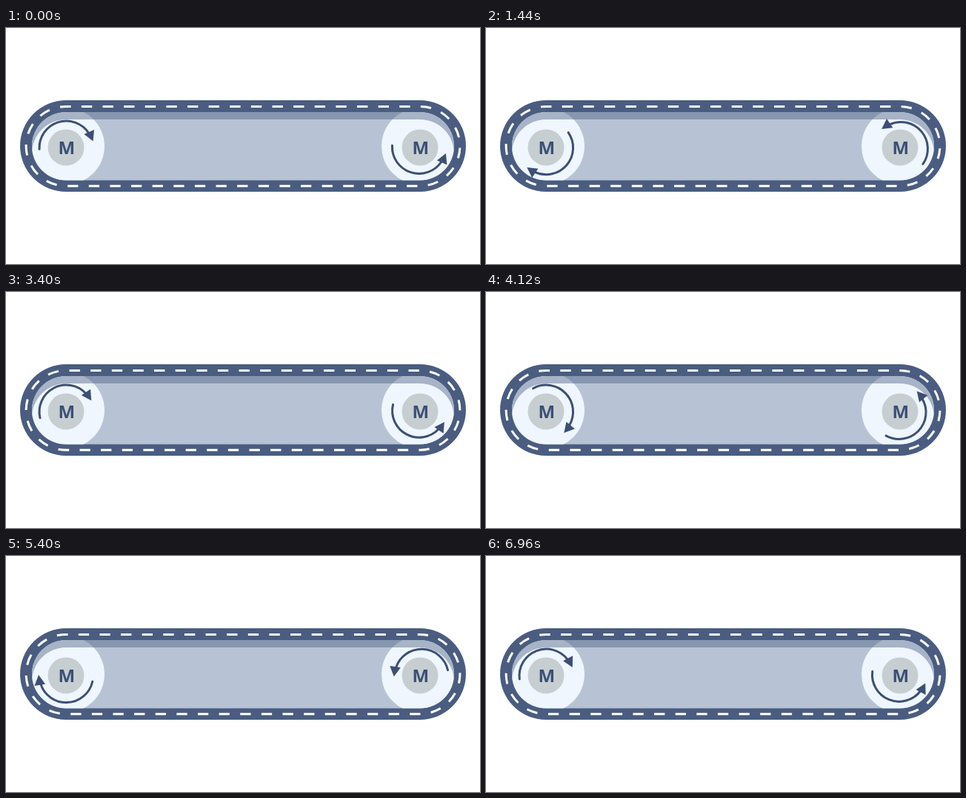
An HTML page for the animation above (7 s loop, 640 by 320 pixels).

```html
<!DOCTYPE html>
<html lang="en">
<head>
<meta charset="utf-8">
<title>Conveyor belt</title>
<style>
  html, body { margin: 0; width: 100%; height: 100%; overflow: hidden; background: #fff; }
  svg { display: block; width: 100%; height: 100%; }
  text { font: 700 24px "Open Sans", "Noto Sans", sans-serif; fill: #3a4f75; text-anchor: middle; }
  .dash { fill: none; stroke: #fff; stroke-width: 3; }
</style>
</head>
<body>
<svg viewBox="0 0 640 320" xmlns="http://www.w3.org/2000/svg">
  <defs>
    <clipPath id="inside"><rect x="35" y="114" width="570" height="92.5" rx="46.2"/></clipPath>
    <g id="arrow">
      <path d="M-36.25 1.9A36.3 36.3 0 0 1 30.4 -19.8" fill="none" stroke="#3c4f75" stroke-width="3" stroke-linecap="round"/>
      <path d="M36.2 -8.9L24.2 -18.4L37.7 -24.4Z" fill="#3c4f75"/>
    </g>
  </defs>

  <rect x="19" y="98" width="602" height="124" rx="62" fill="#4a5d80"/>
  <g clip-path="url(#inside)">
    <rect x="35" y="114" width="570" height="93" fill="#b7c2d5"/>
    <circle cx="81" cy="160.3" r="52" fill="#eff6fd"/>
    <circle cx="559" cy="160.3" r="52" fill="#eff6fd"/>
    <path fill="#485b7e" fill-opacity=".43" fill-rule="evenodd"
      d="M30 110H610V220H30ZM81.2 124H558.8a46.2 46.2 0 0 1 0 92.4H81.2a46.2 46.2 0 0 1 0 -92.4Z"/>
  </g>

  <path class="dash" id="run" d="M81 106.4H559a53.9 53.9 0 0 1 0 107.8H81"/>
  <path class="dash" id="bend" d="M81 214.2a53.9 53.9 0 0 1 0 -107.8"/>

  <circle cx="81" cy="162" r="24.5" fill="#c7ced1"/>
  <circle cx="559" cy="162" r="24.5" fill="#c7ced1"/>
  <text x="81.7" y="170.5">M</text>
  <text x="559.7" y="170.5">M</text>

  <g id="left"><use href="#arrow"/></g>
  <g id="right"><use href="#arrow" transform="translate(-1.6 -.9) scale(1 -1)"/></g>
</svg>
<script>
  const LOOP = 7000, STEP = 40;
  const PITCH = 28.63, DASHES = 45, DASHES_PER_LOOP = 5, TURNS = 2;
  const RUN_LENGTH = 956 + Math.PI * 53.9;
  const FIRST_DASH = -7.7;

  const [run, bend, left, right] = ["run", "bend", "left", "right"].map(id => document.getElementById(id));

  // The left bend takes up the slack so that the dashes close evenly.
  run.setAttribute("pathLength", RUN_LENGTH);
  bend.setAttribute("pathLength", DASHES * PITCH - RUN_LENGTH);
  for (const path of [run, bend]) path.setAttribute("stroke-dasharray", `${PITCH / 2} ${PITCH / 2}`);

  function draw(time) {
    const p = Math.floor((time % LOOP) / STEP) * STEP / LOOP;
    const offset = -FIRST_DASH - (p * DASHES_PER_LOOP % 1) * PITCH + PITCH;
    const angle = 360 * TURNS * p;
    run.setAttribute("stroke-dashoffset", offset);
    bend.setAttribute("stroke-dashoffset", offset + RUN_LENGTH);
    left.setAttribute("transform", `translate(81.3 162.4) rotate(${angle})`);
    right.setAttribute("transform", `translate(559.3 162.1) rotate(${-angle})`);
  }

  const start = performance.now();
  function tick() {
    draw(performance.now() - start);
    requestAnimationFrame(tick);
  }
  tick();
</script>
</body>
</html>
```
